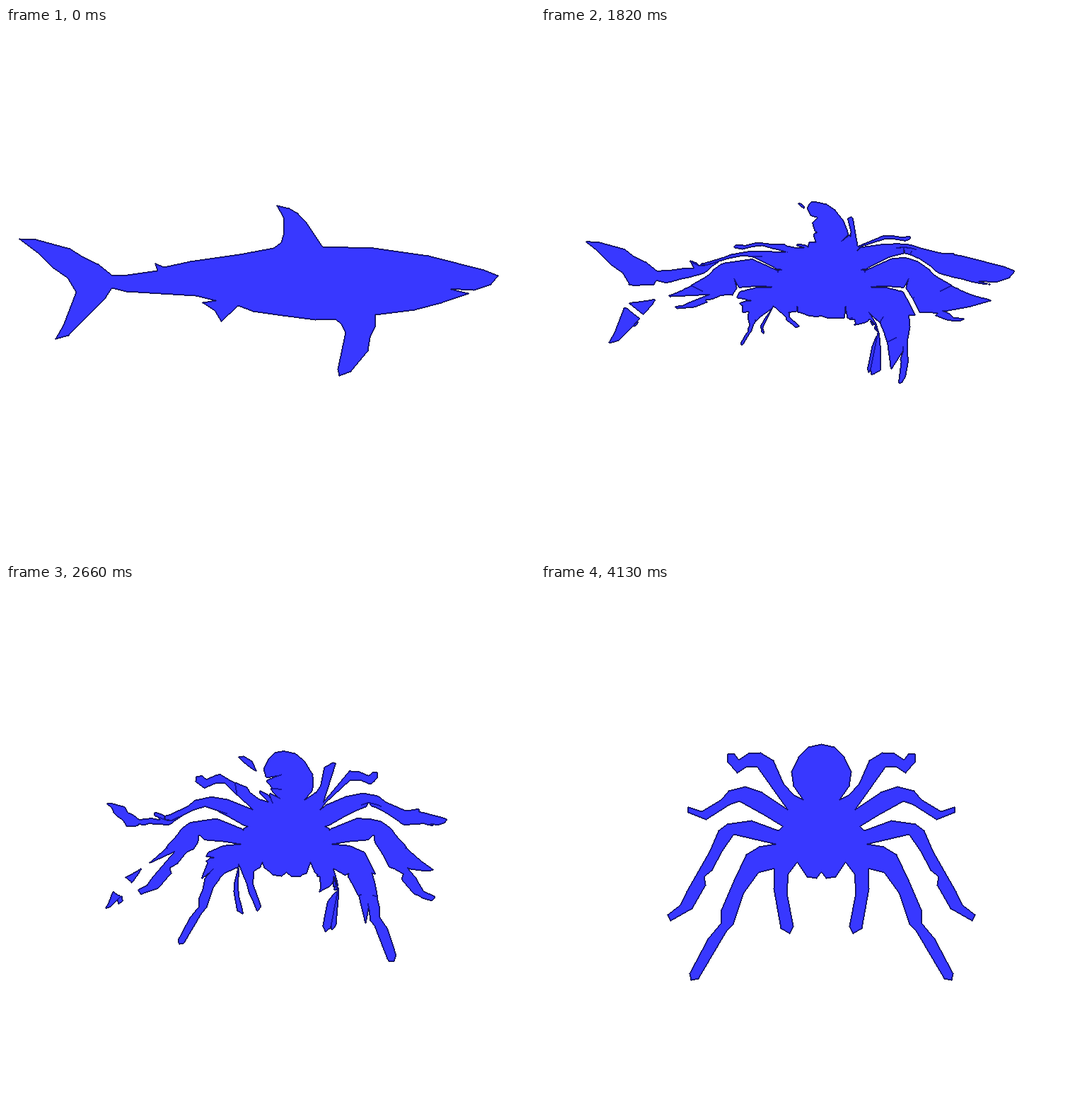
An HTML page with a canvas that plays this animation: 748 px wide and 748 px high, repeating every 4830 ms.

```html
<!DOCTYPE html>
<html lang="en">
<head>
<meta charset="utf-8">
<title>Shape morph</title>
<style>
html, body { margin: 0; width: 100%; height: 100%; overflow: hidden; background: #fff; }
canvas { display: block; }
</style>
</head>
<body>
<canvas width="748" height="748"></canvas>
<script>
const points = (...parts) => parts.join(" ").split(" ").map(p => p.split(",").map(Number));

const shark = points(
  /* tail top */ "19,298 42,299 90,312 109,324 130,334 150,350 172,349 214,343 211,333 223,338 260,330 330,320 378,311",
  /* dorsal fin */ "389,303 393,289 392,267 383,251 400,255 412,262 424,275 447,309",
  /* head */ "519,311 597,322 675,342 695,350 685,362 661,370 624,368 653,375 615,388 577,398 521,405",
  /* pectoral fin */ "521,422 514,437 511,456 487,485 471,491 469,482 480,430 474,418 465,411",
  /* belly */ "437,412 391,406 349,400 328,392 304,414 295,399 278,388 297,385 268,378 170,372 149,367",
  /* tail bottom */ "140,381 88,434 70,439 81,420 99,373 87,353 67,339 48,320"
);

// Right half from the top of the abdomen to the notch between the jaws; the left half mirrors it.
const half = points(
  /* abdomen */ "396,225 414,229 428,243 438,264 435,284 421,304",
  /* leg 1 */ "436,296 450,280 464,248 482,237 499,238 513,247 519,239 528,239 528,250 515,265 501,256 487,256 443,318",
  /* leg 2 */ "480,293 504,285 527,291 537,303 565,320 584,314 584,321 559,331 526,310 512,305 476,325 450,341",
  /* leg 3 */ "457,347 495,333 529,338 541,347 554,377 566,398 586,433 595,452 613,466 609,474 579,457 560,424 562,412 551,403 536,375 520,352 460,366",
  /* leg 4 */ "484,370 502,381 519,417 537,459 537,477 556,500 582,549 580,558 570,556 531,490 521,479 506,435 485,406 462,400",
  /* palp and jaw */ "463,429 453,485 441,492 436,482 445,435 443,408 430,391 416,412 403,414 396,405"
);
const spider = half.concat(half.slice(1, -1).reverse().map(([x, y]) => [792 - x, y]));

const X = 10, Y = 215, W = 695, H = 355, N = W * H;
const ctx = document.querySelector("canvas").getContext("2d");
const image = ctx.createImageData(W, H);
const pixels = new Uint32Array(image.data.buffer);
const FILL = 0xffff3838, OUTER = 0xff401818, INNER = 0xffa01414, WHITE = 0xffffffff;

// Signed distance (negative inside) and nearest shape point for every pixel.
function field(shape) {
  const edges = shape.map(([x, y], i) => {
    const [x2, y2] = shape[(i + 1) % shape.length], dx = x2 - x, dy = y2 - y;
    return { x, y, dx, dy, len2: dx * dx + dy * dy };
  });
  const f = { d: new Float32Array(N), x: new Float32Array(N), y: new Float32Array(N) };
  for (let i = 0; i < N; i++) {
    const px = X + i % W, py = Y + Math.floor(i / W);
    let best = 1e9, bx = 0, by = 0, inside = false;
    for (const e of edges) {
      const rx = px - e.x, ry = py - e.y;
      const t = Math.max(0, Math.min(1, (rx * e.dx + ry * e.dy) / e.len2));
      const ex = rx - t * e.dx, ey = ry - t * e.dy, d = ex * ex + ey * ey;
      if (d < best) { best = d; bx = px - ex; by = py - ey; }
      if ((ry < 0) !== (ry < e.dy) && rx < e.dx * ry / e.dy) inside = !inside;
    }
    f.d[i] = Math.sqrt(best) * (inside ? -1 : 1);
    f.x[i] = inside ? px : bx;
    f.y[i] = inside ? py : by;
  }
  return f;
}

function sample(d, x, y) {
  x -= X; y -= Y;
  if (!(x >= 0 && y >= 0 && x < W - 1 && y < H - 1)) return Infinity;
  const ix = Math.floor(x), iy = Math.floor(y), i = iy * W + ix;
  const u = x - ix, w = y - iy;
  return (d[i] * (1 - u) + d[i + 1] * u) * (1 - w) + (d[i + W] * (1 - u) + d[i + W + 1] * u) * w;
}

// Pixels reached when each point of "from" keeps the share s of its distance to the nearest point of "to".
function reach(from, to, s, out) {
  for (let i = 0; i < N; i++) {
    if (to.d[i] <= 0) { out[i] = from.d[i] <= 0; continue; }
    out[i] = 0;
    const r = to.d[i] / s;
    if (!(r < 800)) continue;
    const nx = to.x[i], ny = to.y[i];
    const ax = nx + (X + i % W - nx) / s, ay = ny + (Y + Math.floor(i / W) - ny) / s;
    if (sample(from.d, ax, ay) <= 0 && sample(to.d, ax, ay) > r - 0.5) out[i] = 1;
  }
}

const A = field(shark), B = field(spider);
const inA = new Uint8Array(N), inB = new Uint8Array(N);
const on = i => inA[i] || inB[i];
const near = (f, i, j) => (f.x[i] - f.x[j]) ** 2 + (f.y[i] - f.y[j]) ** 2 < 4;
const joined = (i, j) => inA[i] && inA[j] && near(B, i, j) || inB[i] && inB[j] && near(A, i, j);

function draw(step) {
  const x = step / 50;
  const a = x < 0.5 ? 2 * x * x : 1 - 2 * (1 - x) ** 2;
  reach(A, B, 1 - a, inA);
  reach(B, A, a, inB);
  // Pieces pulled apart show a seam; the two end shapes have none.
  const linked = a % 1 ? joined : (i, j) => on(j);
  for (let i = 0; i < N; i++) {
    const sides = [i - 1, i + 1, i - W, i + W];
    if (on(i)) pixels[i] = sides.every(j => linked(i, j)) ? FILL : INNER;
    else pixels[i] = sides.some(on) ? OUTER : WHITE;
  }
  ctx.putImageData(image, X, Y);
}

let shown = -1;
const start = performance.now();
function tick() {
  const t = (performance.now() - start) % 4830;
  const step = t < 700 ? 0 : Math.min(50, Math.floor((t - 700) / 70) + 1);
  if (step !== shown) draw(shown = step);
  requestAnimationFrame(tick);
}
tick();
</script>
</body>
</html>
```
